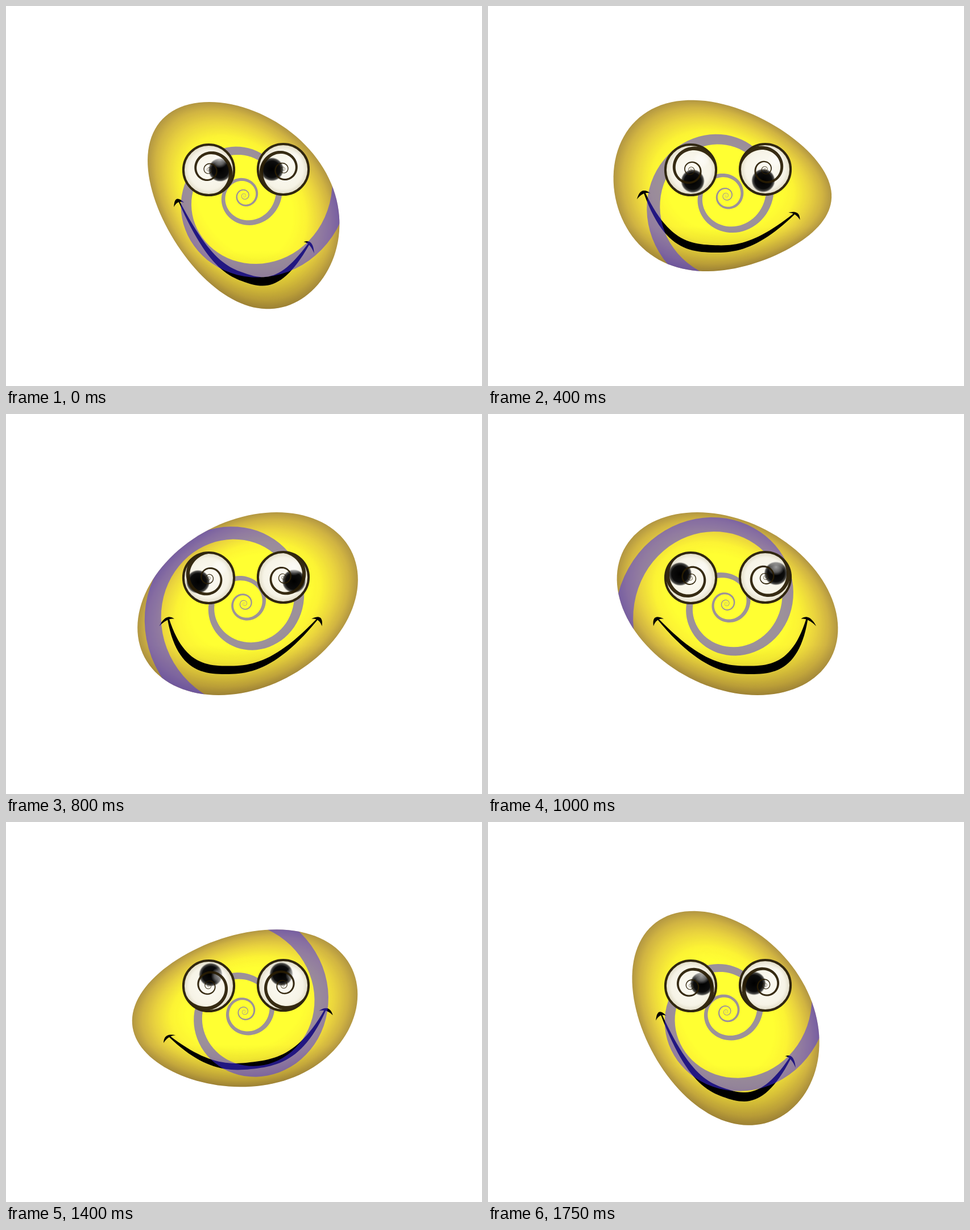
Recreate the animation shown at these times as an HTML page with a canvas. Size 837x669 px, loop 1800 ms.

```html
<!DOCTYPE html>
<html lang="en">
<head>
<meta charset="utf-8">
<title>Wobbling smiley</title>
<style>
html, body { margin: 0; width: 100%; height: 100%; overflow: hidden; background: #fff; }
canvas { display: block; }
</style>
</head>
<body>
<canvas id="stage" width="837" height="669"></canvas>
<script>
const ctx = document.getElementById('stage').getContext('2d');
const LOOP = 1800, STEP = 50, TAU = Math.PI * 2, GROWTH = 2.77;

// Face pose: [degrees, centre x, y, right axis x, y, down axis x, y, twist x, y]
const POSES = [
  [0, 418, 352, 167, 54, 2, 174, -24, -3],
  [40, 416, 338, 158, 45, 8, 180, -12, -16],
  [80, 411, 323, 190, 32, -24, 144, -11, -34],
  [120, 425, 335, 140, -6, 45, 190, 18, -8],
  [160, 425, 334, 187, 0, -51, 161, 0, 0],
  [180, 418, 334, 217, 0, 0, 131, 0, 0],
  [200, 421, 334, 187, 0, 53, 161, 0, 0],
  [240, 409, 335, 139, 9, -45, 191, 21, 8],
  [280, 421, 332, 197, -36, 20, 133, -10, 17],
  [325, 418, 324, 148, 30, -12, 199, 0, 0],
  [350, 418, 347, 164, 56, 0, 180, -14, -6]
];

function key(i) {
  const n = POSES.length, p = POSES[(i + n) % n];
  return [p[0] + 360 * Math.floor(i / n), ...p.slice(1)];
}

// Smooth cyclic interpolation through the poses
function poseAt(deg) {
  let i = POSES.length - 1;
  while (POSES[i][0] > deg) i--;
  const [a, b, c, d] = [key(i - 1), key(i), key(i + 1), key(i + 2)];
  const h = c[0] - b[0], s = (deg - b[0]) / h;
  return b.slice(1).map((v, j) => {
    const k = j + 1;
    const m0 = (c[k] - a[k]) / (c[0] - a[0]) * h;
    const m1 = (d[k] - b[k]) / (d[0] - b[0]) * h;
    const e = c[k] - v;
    return v + s * (m0 + s * (3 * e - 2 * m0 - m1 + s * (m0 + m1 - 2 * e)));
  });
}

function warp(p, u, v) {
  return [
    p[0] + u * p[2] + v * p[4] + u * v * p[6],
    p[1] + u * p[3] + v * p[5] + u * v * p[7]
  ];
}

function polygon(points) {
  ctx.beginPath();
  for (const [x, y] of points) ctx.lineTo(x, y);
  ctx.closePath();
}

function disc(pose, r) {
  const lift = -0.05 * (1 - r), pts = [];
  for (let i = 0; i < 120; i++) {
    const a = i / 120 * TAU;
    pts.push(warp(pose, r * Math.cos(a), r * Math.sin(a) + lift));
  }
  polygon(pts);
}

const SHADES = [
  [0.52, 255, 255, 50], [0.66, 252, 243, 52], [0.8, 234, 212, 62],
  [0.92, 209, 180, 66], [1, 180, 152, 66]
];

function shade(r) {
  let i = 1;
  while (i < SHADES.length - 1 && SHADES[i][0] < r) i++;
  const a = SHADES[i - 1], b = SHADES[i];
  const s = Math.max(0, (r - a[0]) / (b[0] - a[0]));
  const rgb = [1, 2, 3].map(k => Math.round(a[k] + (b[k] - a[k]) * s));
  return `rgb(${rgb})`;
}

function drawFace(pose) {
  for (let r = 1; r > 0.51; r -= 0.01) {
    disc(pose, r);
    ctx.fillStyle = shade(r);
    ctx.fill();
  }
  const g = ctx.createLinearGradient(0, pose[1], 0, pose[1] + pose[5]);
  g.addColorStop(0.45, 'rgba(70,45,0,0)');
  g.addColorStop(1, 'rgba(70,45,0,0.2)');
  disc(pose, 1);
  ctx.fillStyle = g;
  ctx.fill();
}

function quad(a, c, b, n = 12) {
  return Array.from({ length: n + 1 }, (_, i) => {
    const s = i / n, q = 1 - s;
    return [0, 1].map(k => q * q * a[k] + 2 * q * s * c[k] + s * s * b[k]);
  });
}

function drawSmile(pose) {
  const fill = pts => {
    polygon(pts.map(([u, v]) => warp(pose, u, v)));
    ctx.fill();
  };
  ctx.fillStyle = '#000';
  const top = [], low = [], n = 48;
  for (let i = 0; i <= n; i++) {
    const s = i / n * 2 - 1, u = 0.7 * s;
    const v = 0.17 + 0.555 * (1 - Math.abs(s) ** 2.6);
    const w = 0.007 + 0.038 * (1 - s * s);
    top.push([u + s * -w * 0.7, v - w]);
    low.unshift([u + s * w * 0.7, v + w]);
  }
  fill(top.concat(low));
  for (const side of [-1, 1]) {
    const a = [side * 0.765, 0.245], b = [side * 0.645, 0.165];
    fill(quad(a, [side * 0.742, 0.1], b).concat(quad(b, [side * 0.712, 0.155], a)));
  }
}

// Logarithmic spiral band; radius r at angle a when t = 0
function spiral(x, y, r, a, dir, t, half) {
  const outer = [], inner = [];
  for (let k = -4; k <= 3; k += 1 / 72) {
    const ang = a + dir * TAU * (k - t), q = r * GROWTH ** k;
    const c = Math.cos(ang), s = Math.sin(ang);
    outer.push([x + q * (1 + half) * c, y + q * (1 + half) * s]);
    inner.unshift([x + q * (1 - half) * c, y + q * (1 - half) * s]);
  }
  polygon(outer.concat(inner));
}

function circle(x, y, r) {
  ctx.beginPath();
  ctx.arc(x, y, r, 0, TAU);
}

function glow(x, y, r, stops) {
  const g = ctx.createRadialGradient(x, y, 0, x, y, r);
  for (const [at, color] of stops) g.addColorStop(at, color);
  ctx.fillStyle = g;
  circle(x, y, r);
  ctx.fill();
}

function drawEye(x, y, dir, t) {
  ctx.save();
  circle(x, y, 45.5);
  ctx.clip();
  glow(x, y, 46, [[0, '#fdfcf5'], [0.75, '#f6f3e6'], [1, '#dcd6c0']]);
  const a = t * TAU;
  glow(x + dir * 20 * Math.cos(a), y + 20 * Math.sin(a), 21,
    [[0, '#000'], [0.7, 'rgba(5,5,5,0.97)'], [0.88, 'rgba(15,15,15,0.75)'], [1, 'rgba(20,20,20,0)']]);
  glow(x + 19, y - 18, 15,
    [[0, 'rgba(255,255,255,0.6)'], [0.6, 'rgba(255,255,255,0.35)'], [1, 'rgba(255,255,255,0)']]);
  spiral(x, y, 23, dir > 0 ? Math.PI : 0, dir, t, 0.085);
  ctx.fillStyle = 'rgba(40,28,4,0.93)';
  ctx.fill();
  ctx.restore();
  circle(x, y, 44.6);
  ctx.lineWidth = 4;
  ctx.strokeStyle = '#30260f';
  ctx.stroke();
}

function draw(t) {
  ctx.fillStyle = '#fff';
  ctx.fillRect(0, 0, 837, 669);
  const pose = poseAt(t * 360);
  drawFace(pose);
  drawSmile(pose);
  ctx.save();
  disc(pose, 1);
  ctx.clip();
  spiral(419, 334, 47, Math.PI / 2, -1, t, 0.09);
  ctx.fillStyle = 'rgba(66,44,250,0.52)';
  ctx.fill();
  ctx.restore();
  drawEye(356.5, 288.5, 1, t);
  drawEye(487.5, 287.5, -1, t);
}

const start = performance.now();
function tick() {
  const ms = (performance.now() - start) % LOOP;
  draw(Math.floor(ms / STEP) * STEP / LOOP);
  requestAnimationFrame(tick);
}
tick();
</script>
</body>
</html>
```
